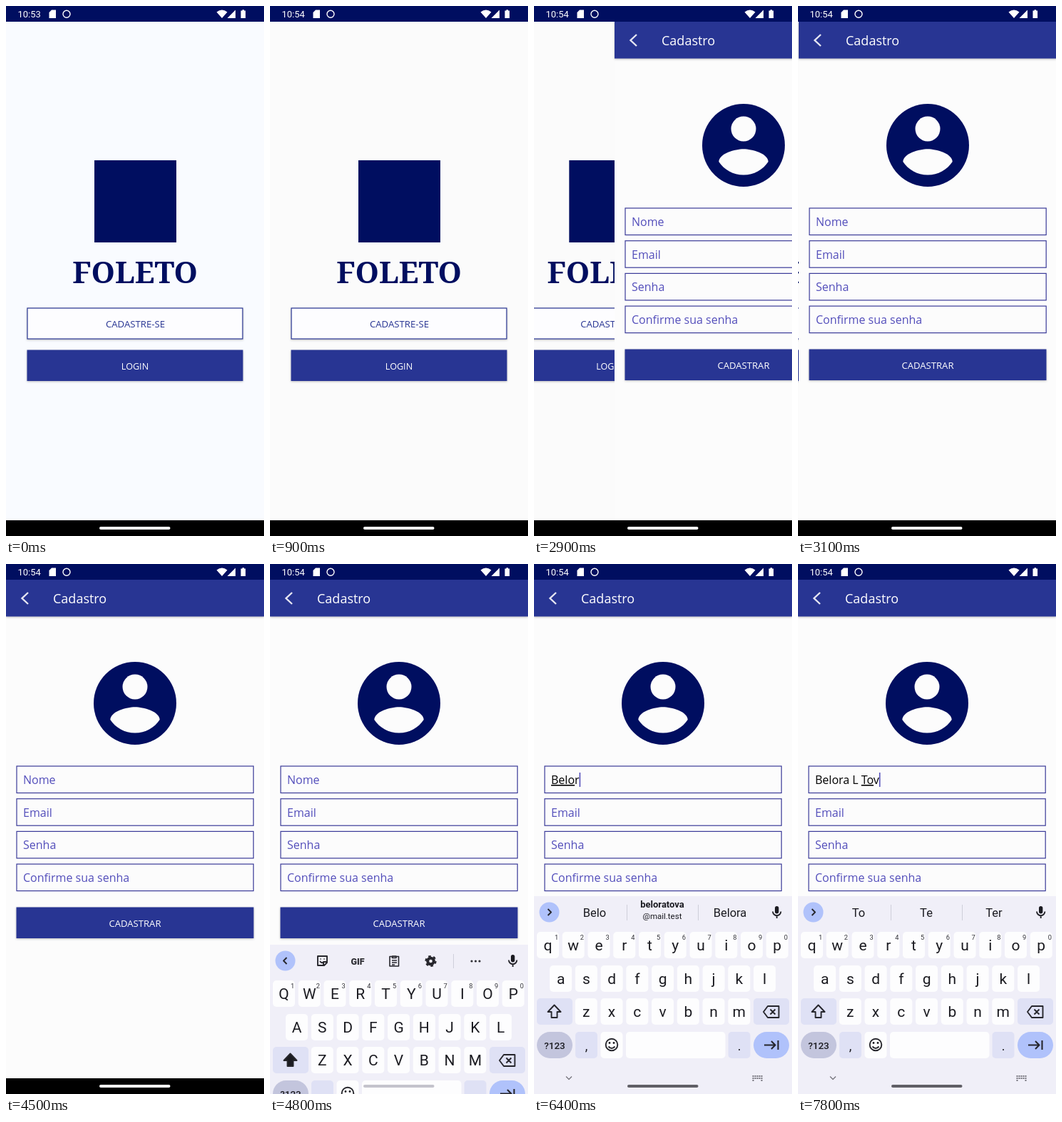
Animation, 362 px wide and 742 px high, one loop 8 s. Source, as an HTML page:

```html
<!DOCTYPE html>
<html lang="pt">
<head>
<meta charset="utf-8">
<style>
html, body { margin: 0; width: 100%; height: 100%; overflow: hidden; background: #fcfcfc; }
svg { display: block; width: 362px; height: 742px; font-family: "Open Sans", "Noto Sans", sans-serif; }
text { white-space: pre; }
.kb { font-family: Roboto, sans-serif; fill: #1b1b21; }
.line { fill: none; stroke: #26262c; stroke-width: 1.9; stroke-linejoin: round; }
.raised { filter: drop-shadow(0 1.5px 1.5px rgba(0, 0, 0, .25)); }
</style>
</head>
<body>
<svg id="stage" viewBox="0 0 362 742"></svg>
<script>
const NAVY = '#000e60', INDIGO = '#283593', LOOP = 8000, TICK = 100;
const stage = document.getElementById('stage');
const clamp = v => Math.max(0, Math.min(1, v));
const last = (list, t) => list.filter(s => s[0] <= t).pop();

const rect = (x, y, w, h, fill, more = '') =>
  `<rect x="${x}" y="${y}" width="${w}" height="${h}" fill="${fill}" ${more}/>`;
const text = (x, y, size, str, fill, more = '') =>
  `<text x="${x}" y="${y}" font-size="${size}" fill="${fill}" ${more}>${str}</text>`;
const mid = (x, y, size, str, fill, more = '') => text(x, y, size, str, fill, 'text-anchor="middle" ' + more);
const path = (d, more = '') => `<path d="${d}" ${more}/>`;
const line = (d, more = '') => path(d, 'class="line" ' + more);
const circle = (x, y, r, more = '') => `<circle cx="${x}" cy="${y}" r="${r}" ${more}/>`;
const group = (x, y, body, more = '') => `<g transform="translate(${x} ${y})" ${more}>${body}</g>`;
const MEDIUM = 'font-weight="500"';

// time, settled text, underlined text, newest text, capitals
const typing = [
  [0, '', '', '', true],
  [5700, '', '', 'B', false],
  [5900, '', 'B', 'e', false],
  [6000, '', 'Be', 'l', false],
  [6200, '', 'Bel', 'o', false],
  [6400, '', 'Belo', 'r', false],
  [6500, '', 'Belor', 'a', false],
  [6700, '', 'Belora', '', false],
  [6900, 'Belora ', '', '', true],
  [7000, 'Belora ', 'L', '', false],
  [7100, 'Belora L ', '', '', true],
  [7200, 'Belora L ', '', 'T', false],
  [7400, 'Belora L ', 'T', '', false],
  [7600, 'Belora L ', 'T', 'o', false],
  [7800, 'Belora L ', 'To', 'v', false]
];

const hints = [
  [0],
  [5900, 'Bom', 'Boa', 'Bem'],
  [6200, 'Bel', 'Belo', 'Bela'],
  [6400, 'Belo', 'beloratova@mail.test', 'Belora'],
  [6700, 'Belora', 'Belo', 'Bela'],
  [6900, 'da', 'e', 'de'],
  [7400, 'To', 'Te', 'Ter']
];

const pillTones = [[0, '#fff'], [4700, '#c4c3cc'], [5300, '#a09fa8'], [5700, '#8b8a92'],
  [6000, '#75747b'], [6400, '#605f66']];

function statusBar(t) {
  return rect(0, 0, 362, 22, NAVY) +
    text(16.5, 16, 13, t < 100 ? '10:53' : '10:54', '#fff', 'font-family="Roboto, sans-serif"') +
    path('M64 5.5h6v11.5h-9.5v-8z', 'fill="#fff"') +
    circle(85, 11.3, 5, 'fill="none" stroke="#fff" stroke-width="1.4"') +
    path('M295.5 8.5Q303 2.5 310.5 8.5L303 17z M322 5.5v11.5h-11.5z', 'fill="#fff"') +
    path('M329.5 6.5h2v-1.3h2.6v1.3h2v10.5h-6.6z', 'fill="#fff"');
}

function welcome(t) {
  const p = clamp(t / 900), bg = `rgb(${249 + 2 * p},251,${255 - 4 * p})`;
  return rect(0, 22, 362, 698, bg) +
    rect(124, 216, 115, 115, NAVY) +
    mid(181, 388, 42.5, 'FOLETO', NAVY, 'font-family="Noto Serif, serif" font-weight="700"') +
    rect(30, 423, 302, 43, '#fdfdff', `stroke="${INDIGO}" stroke-width="1.2" class="raised"`) +
    mid(181.5, 449.5, 13.2, 'CADASTRE-SE', INDIGO, MEDIUM) +
    rect(29.5, 481.5, 303, 43.5, INDIGO, 'class="raised"') +
    mid(181, 508.5, 12.6, 'LOGIN', '#fff', MEDIUM);
}

function signup(t) {
  const [, done, under, fresh] = last(typing, t);
  const typed = done + under + fresh;
  const caret = typed || (t >= 3950 && Math.floor((t - 3950) / 500) % 2 === 0);
  const fields = ['Nome', 'Email', 'Senha', 'Confirme sua senha'].map((label, i) => {
    const y = 283 + 45.7 * i;
    const value = i || !typed
      ? text(24, y + 25, 16, label, '#534ebb')
      : text(24, y + 25, 16, `${done}<tspan text-decoration="underline">${under}</tspan>${fresh}`, '#000', 'id="typed"');
    return rect(15, y, 332.2, 37.5, 'none', 'stroke="#3a3a98" stroke-width="1.2"') + value;
  }).join('');
  return rect(0, 22, 362, 698, '#fcfcfc') +
    rect(0, 22, 362, 51.5, INDIGO, 'class="raised"') +
    path('M31 40l-8.5 8 8.5 8', 'fill="none" stroke="#e6e6f2" stroke-width="2.4"') +
    text(66, 54.5, 18, 'Cadastro', '#fff', MEDIUM) +
    circle(181, 195, 58, `fill="${NAVY}"`) +
    circle(181, 172, 17.5, 'fill="#fcfcfc"') +
    path('M181 236.6c-14.5 0-27.2-7.4-34.7-18.6 .2-11.5 23.1-17.8 34.7-17.8s34.5 6.3 34.7 17.8c-7.5 11.2-20.2 18.6-34.7 18.6z', 'fill="#fcfcfc"') +
    fields +
    rect(14.5, 480.5, 333, 43.5, INDIGO, 'class="raised"') +
    mid(181, 507.5, 13.1, 'CADASTRAR', '#fff', MEDIUM) +
    (caret ? rect(24, 292, 1.6, 20, '#5550bb', 'id="caret"') : '');
}

const key = (x, y, w, fill = '#fdfdfe', r = 5) => rect(x, y, w, 37, fill, `rx="${r}"`);

function letterRow(x, y, letters, caps) {
  return [...letters].map((c, i) => {
    const cx = x + 35.75 * i;
    return key(cx - 15.5, y, 31) + mid(cx, y + 26, 21, caps ? c.toUpperCase() : c, '#1b1b21') +
      (y === 515 ? mid(cx + 12, y + 11, 9.3, (i + 1) % 10, '#33333a') : '');
  }).join('');
}

function toolbar() {
  return line('M67 481h13v9l-4 4h-9z M80 489h-5v5 M70 488q3 4 5 1 M71 484.5v1 M76 484.5v1') +
    mid(123, 492.5, 12.5, 'GIF', '#303036', 'font-weight="900"') +
    line('M168 481.5h12.5v13.5h-12.5z M171.5 481h5.5v2.5h-5.5z M171 487h7 M171 490h7 M171 493h4', 'style="stroke-width:1.6"') +
    circle(225.5, 488, 4.3, 'class="line" style="stroke-width:4"') +
    circle(225.5, 488, 7, 'class="line" style="stroke-width:2.2" stroke-dasharray="3.7 3.63"') +
    rect(257, 478, 1, 20, '#cfcfda') +
    [283, 288.5, 294].map(x => circle(x, 488, 1.6, 'fill="#303036"')).join('');
}

function suggestions([, ...words]) {
  return rect(130, 477, 1, 22, '#cfcfda') + rect(230, 477, 1, 22, '#cfcfda') +
    words.map((w, i) => {
      const x = 85 + 95 * i, at = w.indexOf('@');
      return at < 0 ? mid(x, 494, 16.5, w, '#1b1b21')
        : mid(x, 481, 13, w.slice(0, at), '#1b1b21', 'font-weight="600"') + mid(x, 496.5, 11.5, w.slice(at), '#1b1b21');
    }).join('');
}

function keyboard(t) {
  const caps = last(typing, t)[4], words = last(hints, t), open = words.length > 1;
  const special = '#dfe1f5', accent = '#b0c2fb';
  const dots = [0, 1, 2].map(r => [0, 1, 2, 3, 4].map(c =>
    r === 2 && c && c < 4 ? '' : rect(306.5 + 3 * c, 716 + 3 * r, 2, 2, '#77767e')).join('')).join('');
  return rect(0, 465, 362, 277, '#f0eff8') +
    circle(21.5, 487.5, 14, `fill="${accent}"`) +
    line(open ? 'M19.5 483l4.5 4.5-4.5 4.5' : 'M23.5 483l-4.5 4.5 4.5 4.5') +
    (open ? suggestions(words) : toolbar()) +
    rect(338, 479, 5.4, 10.5, '#1b1b21', 'rx="2.7"') +
    line('M335 486.5a5.7 5.7 0 0 0 11.4 0 M340.7 492v4') +
    letterRow(19.5, 515, 'qwertyuiop', caps) +
    letterRow(37.6, 562, 'asdfghjkl', caps) +
    letterRow(73.3, 608, 'zxcvbnm', caps) +
    key(4, 608, 50, special) +
    line('M28.5 617.5l-9 9.5h5v8h8v-8h5z', caps ? 'style="fill:#1b1b21"' : '') +
    key(308, 608, 50, special) +
    line('M328 619h15.5v16h-15.5l-6-8z M331.5 623.5l7 7 M338.5 623.5l-7 7') +
    key(4, 655, 50, '#c3c5dd', 18.5) + mid(29, 678.5, 13.5, '?123', '#1b1b21', MEDIUM) +
    key(58, 655, 31, special) + mid(73.5, 681, 18, ',', '#1b1b21') +
    key(93.5, 655, 31) + circle(109, 673, 8.3, 'class="line"') +
    circle(106, 670.5, 1.4) + circle(112, 670.5, 1.4) + line('M104.5 675.5q4.5 5 9 0') +
    key(129, 655, 139.5) +
    key(272.5, 655, 31, special) + mid(288, 681, 18, '.', '#1b1b21') +
    key(308, 655, 50, accent, 18.5) +
    line('M323 673.5h15 M333 668l5.5 5.5-5.5 5.5 M342.5 667v13', 'style="stroke-width:2.1"') +
    line('M45 717.5l4 4 4-4', 'style="stroke:#77767e;stroke-width:1.3"') + dots;
}

function draw(t) {
  let body = '';
  const off = t < 2900 ? 362 : 362 * Math.exp(-(t - 2850) * .0233);
  const slide = Math.round(off);
  if (slide) body += group(-.3 * (362 - slide), 0, welcome(t));
  if (slide < 362) body += group(slide, 0, signup(t));
  body += statusBar(t) + rect(0, 720, 362, 22, '#000');
  if (t >= 4700) body += group(0, Math.round(277 * (1 - clamp((t - 4650) / 400)) ** 3), keyboard(t), 'class="kb"');
  body += rect(131, 729, 99.5, 4, last(pillTones, t)[1], 'rx="2"');
  stage.innerHTML = body;

  const typed = document.getElementById('typed');
  if (typed) document.getElementById('caret').setAttribute('x', 24 + typed.getComputedTextLength());
}

let shown = -1;
const start = performance.now();
function frame() {
  const t = Math.floor((performance.now() - start) % LOOP / TICK) * TICK;
  if (t !== shown) draw(shown = t);
  requestAnimationFrame(frame);
}
frame();
</script>
</body>
</html>
```
